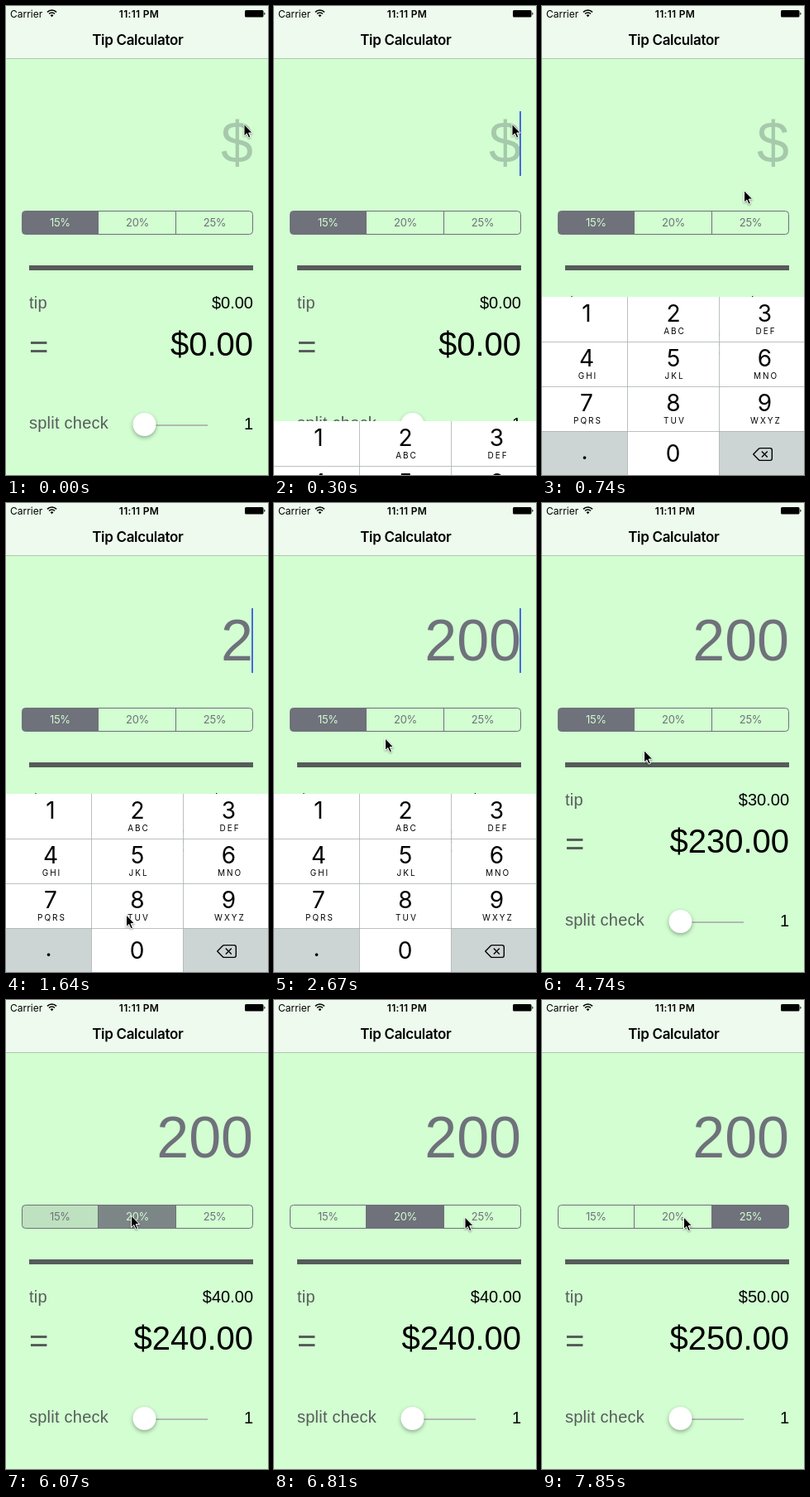
An HTML page for the animation above (8000 ms loop, 317 by 566 pixels).

```html
<!DOCTYPE html>
<html lang="en">
<head>
<meta charset="utf-8">
<title>Tip Calculator</title>
<style>
  html, body { margin: 0; width: 100%; height: 100%; overflow: hidden; background: #d2fed1; }
  svg { display: block; width: 100%; height: 100%; }
  text { font-family: "Liberation Sans", Arial, sans-serif; font-size: 20px; }
  .ui, .ui text { font-family: Inter, Roboto, sans-serif; }
  .end { text-anchor: end; }
  .mid, .mid text { text-anchor: middle; }
  .label { fill: #565c5a; letter-spacing: .25px; }
  .status text { font-size: 12px; }
  .status .time { font-weight: 600; letter-spacing: .3px; }
  .title { font-size: 17px; font-weight: 600; letter-spacing: -.33px; }
  #segments text { font-size: 13px; letter-spacing: -.3px; }
  #bill { font-size: 70px; }
  #total, .equals { font-size: 40px; }
  #keypad .digit { font-size: 28px; }
  #keypad .letters { font-size: 10px; letter-spacing: 2px; }
</style>
</head>
<body>
<svg viewBox="0 0 317 566">
  <rect width="317" height="566" fill="#d2fed1"/>
  <rect width="317" height="63" fill="#edfaed"/>
  <path d="M0 63.5H317" stroke="#b0c4b1"/>

  <g class="ui status">
    <text x="5" y="13.5">Carrier</text>
    <g fill="none" stroke="#000" stroke-width="1.6">
      <path d="M50 7.4a7.6 7.6 0 0 1 11 0M52.1 9.5a4.7 4.7 0 0 1 6.8 0"/>
      <path d="M55.5 13.2l-1.9-2a2.7 2.7 0 0 1 3.8 0z" fill="#000" stroke="none"/>
    </g>
    <text class="time mid" x="161" y="13.5">11:11 PM</text>
    <rect x="289" y="5" width="22.5" height="8.5" rx="1.5"/>
    <path d="M312.3 7.5a2 2 0 0 1 0 3.6z"/>
  </g>
  <text class="ui title mid" x="159.3" y="47">Tip Calculator</text>

  <text id="bill" class="end" x="299"></text>
  <rect id="caret" x="297" y="127" width="2" height="78" fill="#426bdc"/>

  <clipPath id="pill"><rect x="19.5" y="247.5" width="279" height="28" rx="4"/></clipPath>
  <g id="segments" class="ui mid"></g>
  <g fill="none" stroke="#6d7079">
    <rect x="19.5" y="247.5" width="279" height="28" rx="4"/>
    <path d="M111.5 248V275M205.5 248V275"/>
  </g>

  <rect x="28" y="313" width="271" height="6" fill="#565b59"/>
  <text class="label" x="28" y="365">tip</text>
  <text id="tip" class="end" x="299" y="365"></text>
  <text class="label equals" x="28" y="424.5">=</text>
  <text id="total" class="end" x="299" y="421.5"></text>

  <text class="label" x="28" y="510">split check</text>
  <path d="M156 506H244" stroke="#b2b8b4" stroke-width="2"/>
  <circle cx="167.5" cy="505" r="14" fill="#fff" style="filter:drop-shadow(0 2.5px 2.5px #0005)"/>
  <text class="end" x="299" y="510.5">1</text>

  <g id="keypad" class="ui mid"></g>

  <path id="pointer" d="M0 0V14.6L3.3 11.5 5.6 16.7 7.9 15.7 5.7 10.6H10.2Z"
        stroke="#fff" stroke-width="1" style="filter:drop-shadow(0 1px 1px #0006)"/>
</svg>
<script>
  const LOOP = 8000, TICKS = 54;
  const $ = id => document.getElementById(id);

  function add(parent, tag, attrs, text = '') {
    const node = document.createElementNS('http://www.w3.org/2000/svg', tag);
    for (const name in attrs) node.setAttribute(name, attrs[name]);
    node.textContent = text;
    return parent.appendChild(node);
  }

  const GREY = '#6f717b', PALE = '#d2fed1', SIDE_KEY = '#cdd5d4';
  const rates = [15, 20, 25];
  const edges = [19, 111.5, 205.5, 299];
  const segments = rates.map((rate, i) => ({
    fill: add($('segments'), 'rect', {
      x: edges[i], y: 247, width: edges[i + 1] - edges[i], height: 29,
      fill: GREY, 'clip-path': 'url(#pill)'
    }),
    label: add($('segments'), 'text', { x: 65.4 + 93.6 * i, y: 266 }, rate + '%')
  }));

  const keys = {};
  const columns = [0, 103.5, 214.5, 317], centers = [54, 159, 269.5];
  const letters = ['', 'ABC', 'DEF', 'GHI', 'JKL', 'MNO', 'PQRS', 'TUV', 'WXYZ'];
  ['1', '2', '3', '4', '5', '6', '7', '8', '9', '.', '0', ''].forEach((digit, i) => {
    const col = i % 3, row = Math.floor(i / 3), y = 351 + 54 * row;
    const side = row === 3 && col !== 1;
    keys[digit] = add($('keypad'), 'rect', {
      x: columns[col], y, width: columns[col + 1] - columns[col], height: 54,
      fill: side ? SIDE_KEY : '#fff'
    });
    const x = row < 3 ? centers[col] : [51.5, 158.5][col];
    if (digit) add($('keypad'), 'text', { class: 'digit', x, y: y + (row < 3 ? 30 : digit === '.' ? 34 : 37) }, digit);
    if (letters[i]) add($('keypad'), 'text', { class: 'letters', x: x + 1.5, y: y + 45 }, letters[i]);
  });
  add($('keypad'), 'path', {
    d: 'M0 405.5H317M0 459.5H317M0 513.5H317M103.5 351V566M214.5 351V566', stroke: '#aab1af', 'stroke-width': .8
  });
  add($('keypad'), 'path', {
    d: 'M255.7 541L262.3 534.3Q263 533.6 264 533.6H276Q278.3 533.6 278.3 535.9V546.1Q278.3 548.4 276 548.4H264Q263 548.4 262.3 547.7ZM265.8 537.5L272.8 544.5M272.8 537.5L265.8 544.5',
    fill: 'none', stroke: '#000', 'stroke-width': 1.4, 'stroke-linejoin': 'round'
  });

  // Tracks hold [tick, ...values] and are interpolated linearly.
  const pointerTrack = [
    [2, 288, 142.5], [3, 283, 152], [5, 244.5, 222.5], [7, 168, 362], [8, 158, 379], [10, 157, 386],
    [11, 145.5, 497], [12, 149, 532], [13, 150, 537], [16, 150, 537], [17, 146, 437], [18, 134.5, 284],
    [20, 102, 268], [23, 79, 272], [25, 77.5, 282], [27, 112, 297], [28, 123.5, 298.5], [33, 123.5, 298.5],
    [35, 139, 277], [37, 151.5, 260], [42, 151.5, 260], [44, 190, 261], [46, 231, 262],
    [51, 231, 262], [53, 171.5, 262]
  ];
  const keypadTrack = [[1, 216], [2, 150], [3, 12], [4, 0], [30, 0], [31, 110], [32, 216]];
  const billSteps = [[0, 0], [10, 2], [14, 20], [16, 200]];
  const rateSteps = [[0, 0], [41, 1], [49, 2]];
  const caretSteps = [[0, 0], [2, 1], [5, 0], [8, 1], [21, 0], [24, 1], [27, 0]];
  const pressSteps = [[0, null], [8, '2'], [10, null], [13, '0'], [14, null], [15, '0'], [16, null]];

  const stepAt = (steps, tick) => steps.filter(s => s[0] <= tick).pop()[1];

  function trackAt(track, tick) {
    const next = track.findIndex(k => k[0] > tick);
    if (next === 0) return track[0].slice(1);
    if (next < 0) return track[track.length - 1].slice(1);
    const [a, b] = [track[next - 1], track[next]];
    const p = (tick - a[0]) / (b[0] - a[0]);
    return a.slice(1).map((v, i) => v + (b[i + 1] - v) * p);
  }

  const money = value => '$' + value.toFixed(2);

  function draw(tick) {
    const bill = stepAt(billSteps, tick);
    const chosen = stepAt(rateSteps, tick);
    const before = stepAt(rateSteps, Math.max(0, tick - 1));
    const tip = bill * rates[chosen] / 100;

    $('bill').textContent = bill || '$';
    $('bill').setAttribute('y', bill ? 190 : 189);
    $('bill').setAttribute('fill', bill ? GREY : '#a6c9ac');
    $('tip').textContent = money(tip);
    $('total').textContent = money(bill + tip);
    $('caret').setAttribute('opacity', stepAt(caretSteps, tick));

    segments.forEach(({ fill, label }, i) => {
      const fading = chosen !== before;
      const alpha = i === chosen ? (fading ? .85 : 1) : fading && i === before ? .2 : 0;
      fill.setAttribute('opacity', alpha);
      label.setAttribute('fill', i === chosen ? PALE : GREY);
    });

    const pressed = stepAt(pressSteps, tick);
    for (const digit of ['2', '0']) keys[digit].setAttribute('fill', digit === pressed ? SIDE_KEY : '#fff');
    $('keypad').setAttribute('transform', `translate(0 ${trackAt(keypadTrack, tick)})`);
    $('pointer').setAttribute('transform', `translate(${trackAt(pointerTrack, tick)})`);
  }

  const start = performance.now();
  function play() {
    const time = (performance.now() - start) % LOOP;
    draw(Math.min(TICKS - 1, Math.floor((time + 10) * TICKS / LOOP)));
    requestAnimationFrame(play);
  }
  play();
</script>
</body>
</html>
```
